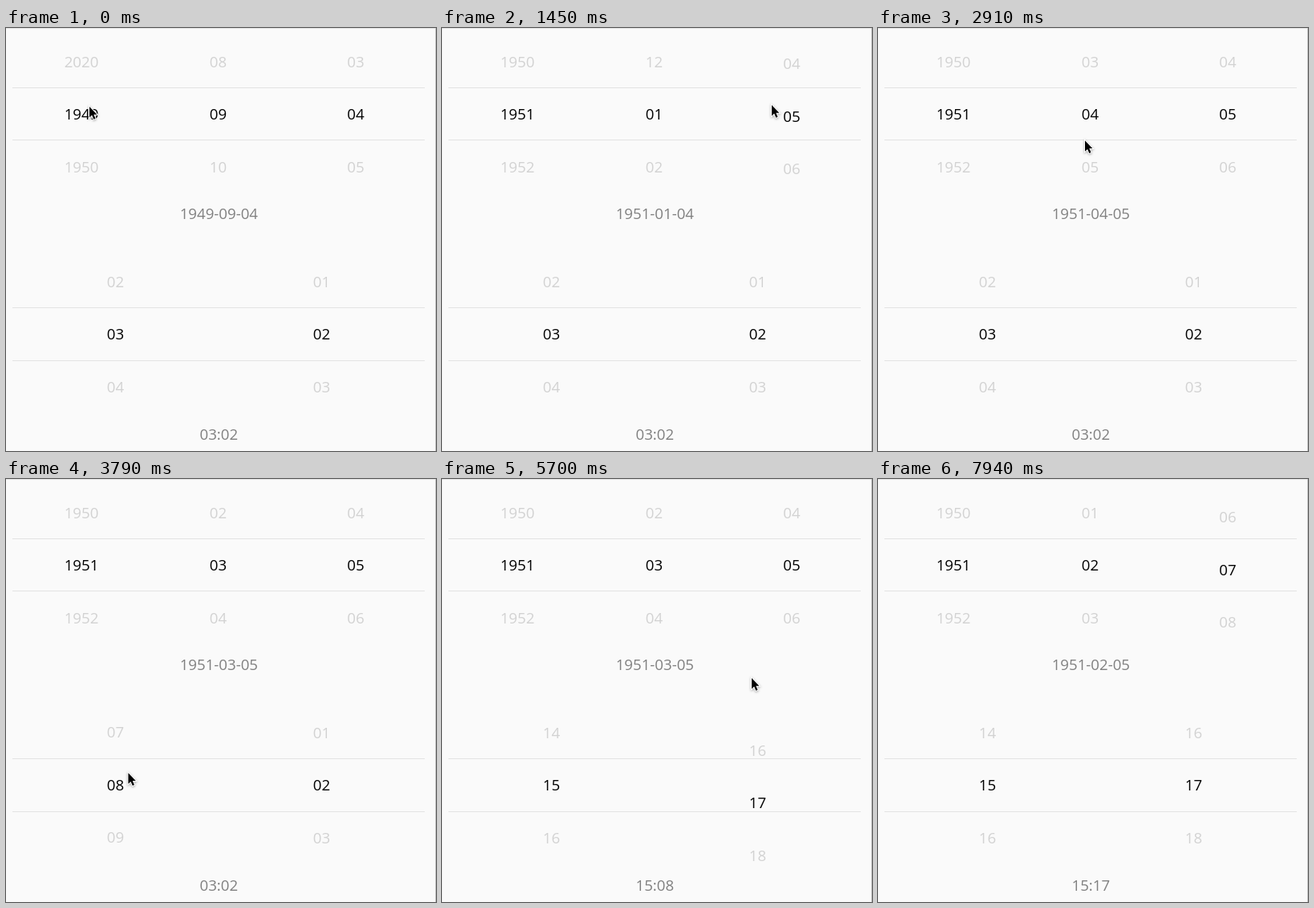
An HTML page with a canvas that plays this animation: 536 px wide and 527 px high, repeating every 8 s.

```html
<!DOCTYPE html>
<html lang="en">
<head>
<meta charset="utf-8">
<title>Date and time picker</title>
<style>
html, body { margin: 0; width: 100%; height: 100%; overflow: hidden; background: #fafafa; }
canvas { display: block; }
</style>
</head>
<body>
<canvas id="stage" width="536" height="527"></canvas>
<script>
const ctx = document.getElementById('stage').getContext('2d');
const W = 536, H = 527, LOOP = 8000, ROW = 65.5;
const MOVE = 300;      // longest pointer travel between gestures
const COMMIT = 130;    // delay from a settled wheel to its label
const HIDE = 7900;     // pointer disappears
const FONT = '18.667px "Open Sans", "Noto Sans", sans-serif';

const pad = n => String(n).padStart(2, '0');
const cycle = (n, first, count) => first + (((n - first) % count) + count) % count;

const wheels = {
  year: { x: 94, first: 1949, count: 72, start: 1949 },
  month: { x: 264.5, first: 1, count: 12, start: 9 },
  day: { x: 436, first: 1, count: 31, start: 4 },
  hour: { x: 136.5, first: 0, count: 24, start: 3 },
  minute: { x: 393.5, first: 0, count: 60, start: 2 }
};
const format = (name, n) => pad(cycle(n, wheels[name].first, wheels[name].count));

// The pointer drags a wheel from y0 to y1, then the wheel glides on to a value
const drag = (name, t0, t1, x, y0, y1, to, end) => ({ name, t0, t1, x, y0, y1, to, end });
const hover = (t, x, y) => ({ t0: t, t1: t, x, y0: y, y1: y });

const gestures = [
  drag('year', 60, 260, 103, 97, 30, 1951, 650),
  drag('month', 600, 810, 274.5, 174.5, 76.5, 13, 1272),
  drag('day', 1100, 1280, 410, 142, 95, 5, 1560),
  hover(2210, 222, 58),
  drag('month', 2400, 2540, 245, 178, 72, 16, 2770),
  drag('month', 2910, 3050, 257, 139, 185, 15, 3250),
  drag('hour', 3500, 3630, 150, 410, 256, 8.4, 3880),
  drag('hour', 3880, 4020, 152, 410, 256, 15, 4540),
  drag('minute', 4540, 4680, 422, 423, 251, 8, 5060),
  drag('minute', 5060, 5200, 390, 420, 250, 13.4, 5480),
  drag('minute', 5480, 5640, 385, 400, 247, 17, 5765),
  hover(6290, 282, 532),
  hover(6480, 336, 532),
  drag('month', 6830, 6990, 272, 85, 135, 14, 7290),
  drag('day', 7620, 7780, 415, 150, 78, 7, 8014)
];

const unit = (t, a, b) => Math.min(1, Math.max(0, (t - a) / (b - a)));
const mix = (a, b, u) => a + (b - a) * u;

function wheelAt(name, t) {
  let v = wheels[name].start;
  for (const g of gestures) {
    if (g.name !== name || t < g.t0) continue;
    v += (g.y0 - g.y1) / ROW * unit(t, g.t0, g.t1);
    v = mix(g.to, v, (1 - unit(t, g.t1, g.end)) ** 2);
  }
  return v;
}

function labelAt(name, t) {
  const done = gestures.filter(g => g.name === name && t >= g.end + COMMIT && Number.isInteger(g.to));
  return format(name, done.length ? done.at(-1).to : wheels[name].start);
}

function pointerAt(t) {
  const i = gestures.findIndex(g => g.t1 > t);
  const next = gestures.at(i), last = gestures[i - 1] || next;
  if (i < 0) return [next.x, next.y1];
  if (t >= next.t0) return [next.x, mix(next.y0, next.y1, unit(t, next.t0, next.t1))];
  if (last === next) return [next.x, next.y0];
  const u = unit(t, Math.max(last.t1, next.t0 - MOVE), next.t0);
  const e = u * u * (3 - 2 * u);
  return [mix(last.x, next.x, e), mix(last.y1, next.y0, e)];
}

function text(str, x, y, color) {
  ctx.fillStyle = color;
  ctx.fillText(str, x, Math.round(y + 6.3));
}

function drawWheel(name, mid, t) {
  const v = wheelAt(name, t), near = Math.round(v);
  for (let n = near - 2; n <= near + 2; n++) {
    text(format(name, n), wheels[name].x, mid + (n - v) * ROW, n === near ? '#000' : '#d2d2d2');
  }
}

function drawPicker(mid, names, t) {
  const top = mid - ROW * 1.5 - 1;
  ctx.save();
  ctx.beginPath();
  ctx.rect(0, top, W, ROW * 3);
  ctx.clip();
  for (const name of names) drawWheel(name, mid, t);
  ctx.restore();
  ctx.fillStyle = '#e3e3e3';
  for (const k of [1, 2]) ctx.fillRect(8, Math.floor(top + ROW * k + 0.3), 514, 1);
}

const arrow = new Path2D('M0 0V14.6L3.4 11.5L5.8 17L8.2 16L5.8 10.6H10.2Z');

function drawPointer(t) {
  const [x, y] = pointerAt(t);
  ctx.save();
  ctx.translate(x + 1, y + 1);
  ctx.scale(0.92, 0.92);
  ctx.shadowColor = 'rgba(0,0,0,.35)';
  ctx.shadowBlur = 3;
  ctx.shadowOffsetY = 1;
  ctx.strokeStyle = '#fff';
  ctx.lineWidth = 2.2;
  ctx.stroke(arrow);
  ctx.shadowColor = 'transparent';
  ctx.fillStyle = '#000';
  ctx.fill(arrow);
  ctx.restore();
}

function draw(t) {
  ctx.fillStyle = '#fafafa';
  ctx.fillRect(0, 0, W, H);
  ctx.fillStyle = '#e4e4e4';
  ctx.fillRect(0, 0, W, 1);
  ctx.fillStyle = '#c4c4c4';
  ctx.fillRect(W - 1, 0, 1, H);

  ctx.font = FONT;
  ctx.textAlign = 'center';
  const date = ['year', 'month', 'day'], time = ['hour', 'minute'];
  drawPicker(107.8, date, t);
  drawPicker(382.1, time, t);
  text(date.map(n => labelAt(n, t)).join('-'), 265.3, 231.7, '#808080');
  text(time.map(n => labelAt(n, t)).join(':'), 265.3, 506.3, '#808080');
  if (t < HIDE) drawPointer(t);
}

const start = performance.now();
function tick() {
  draw((performance.now() - start) % LOOP);
  requestAnimationFrame(tick);
}
tick();
</script>
</body>
</html>
```
